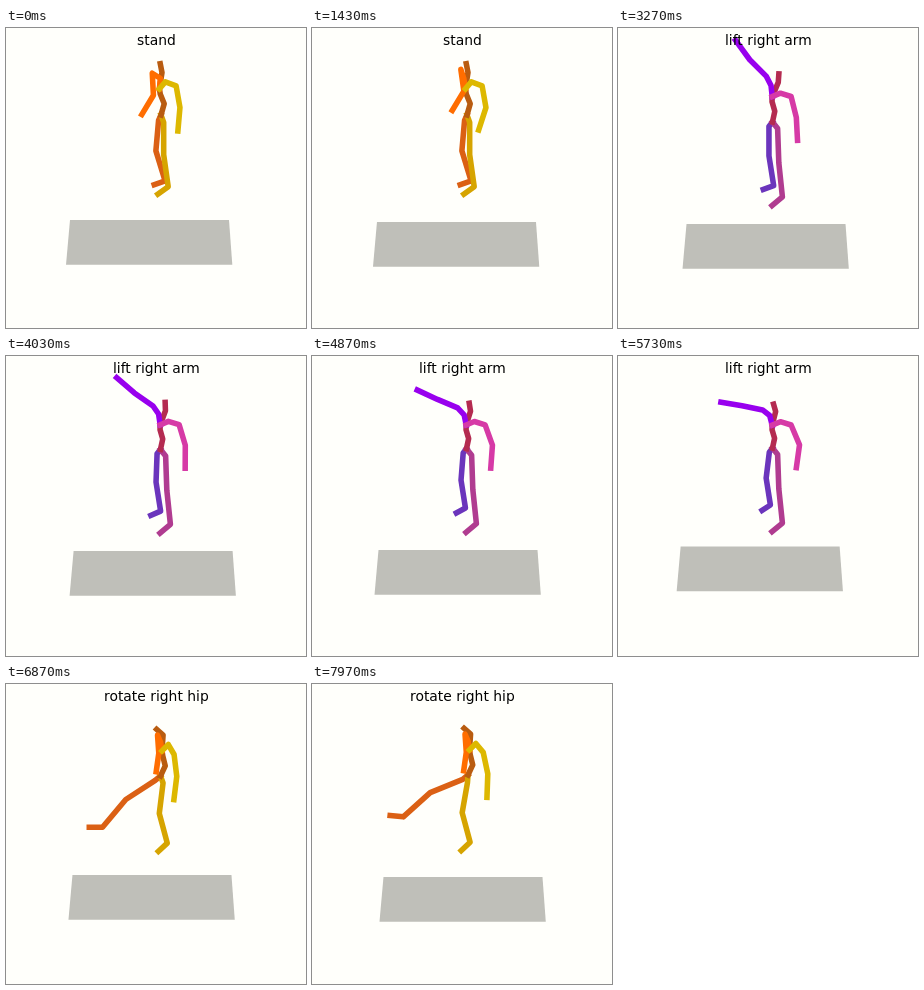
An HTML page with a canvas that plays this animation: 300 by 300 pixels, repeating every 8 s.

```html
<!DOCTYPE html>
<html lang="en">
<head>
<meta charset="utf-8">
<title>Stick figure motion</title>
<style>
  html, body { margin: 0; width: 100%; height: 100%; overflow: hidden; background: #fffffb; }
  canvas { display: block; width: 300px; height: 300px; }
</style>
</head>
<body>
<canvas id="stage" width="300" height="300"></canvas>
<script>
const ctx = document.getElementById('stage').getContext('2d');
const LOOP = 8000, STEP = 1000 / 30;

// Colours run: right leg, left leg, spine, right arm, left arm.
const warm = ['#db6014', '#d6a400', '#b95c10', '#ff6d00', '#ddb800'];
const violet = ['#6b35bc', '#b03c90', '#b42b50', '#9800ee', '#d63aa6'];
const acts = [
  { start: 0, title: 'stand', colors: warm },
  { start: 2667, title: 'lift right arm', colors: violet },
  { start: 6000, title: 'rotate right hip', colors: warm }
];

// The camera follows the figure, so the floor drifts: time, x, y.
const floorPath = [
  [0, 0, 0], [1430, 1, 2], [2500, 2, 3], [2850, 6, 11], [3270, 4.5, 4],
  [4870, 2.5, 2], [5730, -1.5, -1.5], [6200, -5, -2], [6870, 2.5, -1], [7970, 7.5, 1]
];

const progress = (t, from, to) => Math.min(1, Math.max(0, (t - from) / (to - from)));
const smooth = u => u * u * (3 - 2 * u);
const mix = (a, b, u) => a + (b - a) * u;

function floorShift(t) {
  const next = floorPath.findIndex(key => key[0] > t);
  if (next < 0) return floorPath[floorPath.length - 1].slice(1);
  const a = floorPath[next - 1], b = floorPath[next];
  const u = progress(t, a[0], b[0]);
  return [mix(a[1], b[1], u), mix(a[2], b[2], u)];
}

// Joints of all five limbs; angles in degrees, 0 is down, positive turns right.
function figure(t) {
  const toLift = smooth(progress(t, 2450, 3270));
  const toKick = smooth(progress(t, 5850, 6870));
  const blend = (stand, lift, kick) => mix(mix(stand, lift, toLift), kick, toKick);

  const sway = (1 - Math.cos(2 * Math.PI * t / 2860)) / 2;
  const raise = 1 - progress(t, 3270, 5730);
  const swing = progress(t, 6870, 7970);

  const bone = (length, ...angles) => ({ length, angle: blend(...angles) * Math.PI / 180 });
  const limb = (start, scale, ...bones) => {
    const joints = [start];
    for (const { length, angle } of bones) {
      const [x, y] = joints[joints.length - 1];
      joints.push([x + length * scale * Math.sin(angle), y + length * scale * Math.cos(angle)]);
    }
    return joints;
  };

  const pelvis = [blend(155, 154.5, 154.5 + 1.5 * swing), blend(87, 92 + 2 * raise, 92 - swing)];
  const spine = limb(pelvis, blend(1.06, 0.9 + 0.1 * raise, 1.02),
    bone(11, 164, 168, 155),
    bone(10, 202, 196, 194),
    bone(5, 189, 178, 189),
    bone(15.5, 171, 166 - 9 * raise, 176),
    bone(8.5, 191, 196 - 20 * raise, 228));
  const chest = spine[3];

  const rightLeg = limb(pelvis, blend(1, 0.86 + 0.1 * raise, 1.15),
    bone(6, -24, -38, -50),
    bone(30.5, -5, -7 + 7 * raise, -57 - 11 * swing),
    bone(31.5, 17, 9, -40 - 8 * swing),
    bone(11.5, -71, -57 - 13 * raise, -90 - 6 * swing));
  const leftLeg = limb(pelvis, blend(0.98, 1.04, 0.93),
    bone(8, 20, 38, 20 - 24 * swing),
    bone(33, 0, 2, -7 - 3 * swing),
    bone(33, 8, 6, 15),
    bone(13, -54, -50, -47));
  const rightArm = limb(chest, blend(1, 0.95 + 0.12 * raise, 0.83),
    bone(10.5, 175 + 14 * sway, 195 - 9 * raise, 189),
    bone(9.5, 238 - 40 * sway, 232 - 25 * raise, 203),
    bone(22, 3 + 5 * sway, -101 - 34 * raise, 4),
    bone(22.5, -31, -99 - 45 * raise, -8));
  const leftArm = limb(chest, blend(1, 0.98, 1),
    bone(9, 139, 113, 135),
    bone(11.5, 70, 73, 30 + 10 * swing),
    bone(22, 10, 23 - 9 * raise, 7 + 5 * swing),
    bone(23.5, -5 - 13 * sway, -8 + 11 * raise, -7 + 5 * swing));

  return [rightLeg, leftLeg, spine, rightArm, leftArm];
}

function trace(points) {
  ctx.beginPath();
  for (const [x, y] of points) ctx.lineTo(x, y);
}

function draw(t) {
  const act = acts.filter(a => a.start <= t).pop();
  ctx.fillStyle = '#fffffb';
  ctx.fillRect(0, 0, 300, 300);

  ctx.save();
  ctx.translate(...floorShift(t));
  trace([[64, 192], [223, 192], [226.3, 236.7], [60, 236.7]]);
  ctx.fillStyle = '#bfbfb9';
  ctx.fill();
  ctx.restore();

  ctx.lineWidth = 5.56;
  ctx.lineCap = 'square';
  ctx.lineJoin = 'round';
  figure(t).forEach((joints, i) => {
    trace(joints);
    ctx.strokeStyle = act.colors[i];
    ctx.stroke();
  });

  ctx.fillStyle = '#000';
  ctx.font = '13.89px "DejaVu Sans", sans-serif';
  ctx.fillText(act.title, Math.round(150 - ctx.measureText(act.title).width / 2), 17);
}

function tick() {
  const t = performance.now() % LOOP;
  draw(Math.floor(t / STEP) * STEP);
  requestAnimationFrame(tick);
}
tick();
</script>
</body>
</html>
```
